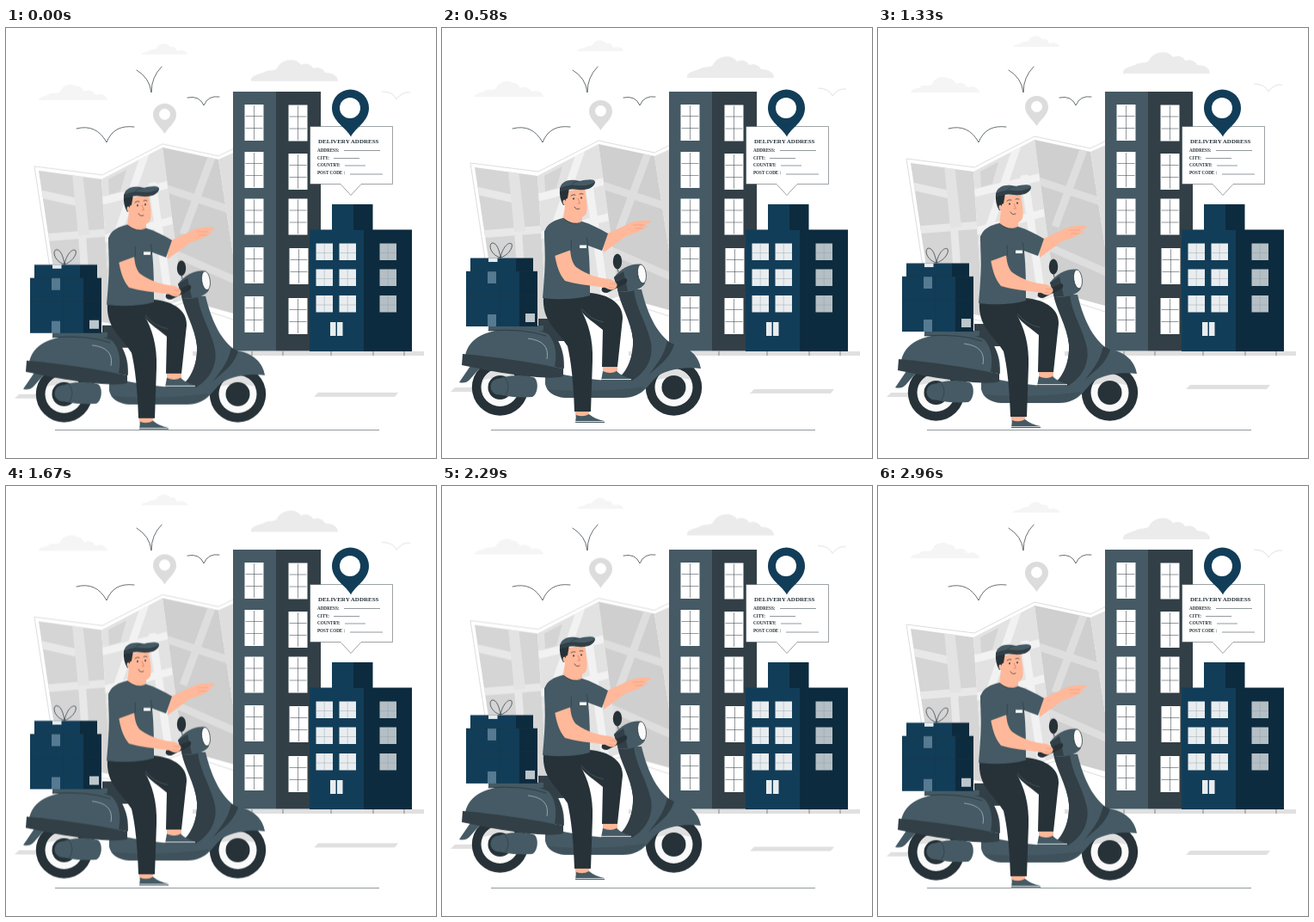
Write an HTML page that moves like this. It is 500x500 px and loops after 3 s.

```html
<!DOCTYPE html>
<html lang="en">
<head>
<meta charset="utf-8">
<title>Delivery address</title>
<style>
  html, body { margin: 0; width: 100%; height: 100%; overflow: hidden; background: #fff; }
  svg { display: block; width: 100vw; height: 100vh; }
  .drift { animation: bob 3s linear -.03s infinite; }
  .ride { animation: bob 1.5s linear -.02s infinite; }
  @keyframes bob { 50% { transform: translateY(-10px); } }

  .slate { fill: #455a64; }
  .deep { fill: #323f46; }
  .ink { fill: #263238; }
  .navy { fill: #123d58; }
  .night { fill: #0d2b3e; }
  .skin { fill: #ffb899; }
  .pale { fill: #e0e0e0; }
  .white { fill: #fff; }
  .line { fill: none; stroke: #263238; stroke-width: .7; stroke-linecap: round; stroke-linejoin: round; }
  .thin { fill: none; stroke: #263238; stroke-width: .5; }
  .road { fill: none; stroke-width: 9; }
  text { font-family: "Liberation Serif", "Times New Roman", serif; font-weight: bold; fill: #263238; }
</style>
</head>
<body>
<svg viewBox="0 0 500 500">
  <defs>
    <g id="tall">
      <rect class="white" width="22" height="42"/>
      <path class="thin" d="M11 1V41M1 13.500H21M1 27.500H21"/>
    </g>
    <g id="pane">
      <rect width="19.5" height="19.5"/>
      <path d="M9.7 0V19.5M0 11H19.5" fill="none" stroke="#8b9aa3" stroke-width=".4"/>
    </g>
    <g id="wheel">
      <circle class="ink" r="32.7"/>
      <circle r="22" fill="#fafafa"/>
      <path class="pale" d="M-20 -9A22 22 0 0 1 20 -9Q0 -14 -20 -9Z"/>
      <circle class="ink" r="14"/>
    </g>
    <clipPath id="p1"><path d="M38 166L111 176 122 344 63 333Z"/></clipPath>
    <clipPath id="p2"><path d="M111 176L182 139 206 316 122 344Z"/></clipPath>
    <clipPath id="p3"><path d="M182 139L247 153 275 335 206 316Z"/></clipPath>
  </defs>

  <!-- sky, map and road marking -->
  <g class="drift">
    <path fill="#f5f5f5" d="M38 84C38 79 47 80 50 77 54 74 59 78 63 74 66 66 77 64 82 68 86 67 89 71 91 74 97 71 102 74 104 78 111 76 117 79 118 84Z"/>
    <path fill="#f5f5f5" d="M157 31C158 27 164 29 167 26 171 24 174 26 176 22 181 17 188 18 191 22 196 21 198 24 199 27 206 25 211 28 211 31Z"/>
    <path fill="#ebebeb" d="M285 62C284 55 294 54 299 52 305 48 311 51 315 47 320 36 337 34 343 43 350 40 355 43 357 47 364 45 369 48 371 52 380 52 386 56 386 62Z"/>
    <path fill="none" stroke="#d4d4d4" stroke-width=".7" d="M437 74Q450 74 454 83Q460 74 470 75"/>

    <path d="M33 161L112 171 182 135 247 149 290 128 300 352 264 339 205 320 122 350 60 338Z" fill="#fff" stroke="#dcdcdc"/>
    <g clip-path="url(#p1)">
      <path fill="#d5d5d5" d="M30 150H130V350H30Z"/>
      <path class="road" stroke="#e8e8e8" d="M83 160L96 350M35 192L84 203M45 244L120 238"/>
      <path fill="#e3e3e3" d="M76 160L88 160 97 240 84 241Z"/>
    </g>
    <g clip-path="url(#p2)">
      <path fill="#e2e2e2" d="M100 130H210V350H100Z"/>
      <path class="road" stroke="#f2f2f2" d="M164 140L122 262M108 202L190 182M112 246L200 222M170 180L190 320"/>
      <path fill="#d4d4d4" d="M119 176L140 165 133 190 120 194Z"/>
    </g>
    <g clip-path="url(#p3)">
      <path fill="#cfcfcf" d="M180 130H280V340H180Z"/>
      <path class="road" stroke="#dedede" d="M184 186L262 212M240 148L206 240M195 262L272 296"/>
    </g>
    <path fill="#dedede" d="M247 153L292 133 295 345 275 335Z"/>

    <path fill="#dcdcdc" fill-rule="evenodd" d="M184.500 123C180 115 171 110 171 101A13.500 13 0 0 1 198 101C198 110 189 115 184.500 123ZM184.500 94A6.500 6.500 0 1 0 184.500 107A6.500 6.500 0 1 0 184.500 94Z"/>
    <path class="pale" d="M363 424H456L452 429H358Z"/>
  </g>

  <g class="line">
    <path d="M82 117Q105 111 117 133Q125 112 149 115"/>
    <path d="M152 49Q167 58 169 75Q169 57 181 45"/>
    <path d="M211 81Q225 78 230 90Q235 78 248 80"/>
  </g>
  <path class="thin" d="M57 467.500H434"/>

  <!-- buildings -->
  <path class="pale" d="M217 376H486V381H217Z"/>
  <path class="thin" d="M286 376V381M322 376V381M378 376V381M427 376V381M463 376V381"/>
  <path class="slate" d="M264 74H314V375.500H264Z"/>
  <path class="deep" d="M314 74H366V375.500H314Z"/>
  <use href="#tall" x="277.500" y="89"/><use href="#tall" x="328.500" y="89.500"/>
  <use href="#tall" x="277.500" y="144"/><use href="#tall" x="328.500" y="146"/>
  <use href="#tall" x="277.500" y="198.500"/><use href="#tall" x="328.500" y="198.500"/>
  <use href="#tall" x="277.500" y="255"/><use href="#tall" x="329.500" y="256"/>
  <use href="#tall" x="277.500" y="312"/><use href="#tall" x="328.500" y="314"/>

  <path class="navy" d="M353 234.500H416V376H353ZM379 205H404V235H379Z"/>
  <path class="night" d="M416 234.500H472V376H416ZM404 205H426.500V235H404Z"/>
  <g fill="#e9edef">
    <use href="#pane" x="360.500" y="250.500"/><use href="#pane" x="387.500" y="250.500"/>
    <use href="#pane" x="360.500" y="280.500"/><use href="#pane" x="387.500" y="280.500"/>
    <use href="#pane" x="360.500" y="311"/><use href="#pane" x="387.500" y="311"/>
    <path d="M377 342H383.500V358H377ZM385 342H391.500V358H385Z"/>
  </g>
  <g fill="#b4bfc5">
    <use href="#pane" x="434.500" y="250.500"/><use href="#pane" x="434.500" y="280.500"/><use href="#pane" x="434.500" y="311"/>
  </g>

  <!-- address card -->
  <path d="M353.500 114.500H449.500V181.500H413L401 194.500 389 181.500H353.500Z" fill="#fff" stroke="#263238" stroke-width=".45"/>
  <text x="363" y="134" font-size="7">DELIVERY ADDRESS</text>
  <g font-size="5.1">
    <text x="362" y="144.300">ADDRESS:</text>
    <text x="362" y="152.800">CITY:</text>
    <text x="362" y="161.200">COUNTRY:</text>
    <text x="362" y="169.800">POST CODE :</text>
  </g>
  <path class="thin" d="M393 142.500H435M381 151.500H411M394 160H418M400 170H438"/>
  <path class="navy" d="M401 126.500C396 116 379 109 379 93A21.500 21.500 0 0 1 422 93C422 109 406 116 401 126.500Z"/>
  <circle class="white" cx="400" cy="93" r="12"/>

  <g class="ride">
    <path class="pale" d="M15 426H85V431H10Z"/>

    <!-- scooter -->
    <path class="slate" d="M20 420L33 401H46L33 416Q28 422 20 420Z"/>
    <use href="#wheel" x="67.500" y="426"/>
    <use href="#wheel" x="269.500" y="426"/>
    <circle class="slate" cx="66" cy="425" r="9.500"/>
    <path class="slate" d="M66 416C78 411 100 411 108 415 113 421 111 434 105 437 92 438 76 437 66 434Z"/>
    <path class="thin" d="M73 414Q81 425 73 436"/>
    <path class="slate" d="M205 312L232 312C240 345 252 365 267 375 288 378 299 390 301 404 285 402 265 404 252 412 240 420 236 438 210 438L143 438C130 437 122 431 120 422L120 406C150 414 180 418 200 418 214 412 223 392 222 370 220 348 207 330 205 312Z"/>
    <path class="deep" d="M204 312C207 330 220 348 222 370 223 392 214 412 200 418L221 418C238 408 246 391 243 374 238 350 224 332 223 310Z"/>
    <path class="deep" d="M262 372L270 376C264 394 252 400 240 412 250 398 258 390 262 372Z"/>
    <path class="deep" d="M122 428Q180 433 236 425Q228 438 210 438H143Q128 437 122 428Z" opacity=".3"/>
    <path class="deep" d="M112 346H152L160 372H112Z"/>
    <path class="slate" d="M54 354H118V360H54Z"/>
    <path class="slate" d="M27 389C31 368 52 359 80 358 118 356 144 364 142 404Z"/>
    <path class="deep" d="M116 358C134 362 142 378 141 404L131 402C135 382 130 366 116 358Z"/>
    <path class="deep" d="M24 387C60 390 105 397 141 404L141 413C125 418 75 411 23 400Z"/>
    <path class="line" d="M54 360Q95 357 121 366"/>
    <path d="M100 369Q126 372 122 393" fill="none" stroke="#b8c4ca" stroke-width=".7"/>

    <path class="line" d="M204 284Q203 292 210 299" stroke-width="1.500"/>
    <ellipse class="ink" cx="204" cy="279.500" rx="5.200" ry="9"/>
    <path class="slate" d="M200 298C208 287 222 281 232 283L236 305C231 313 214 317 205 314Z"/>
    <path class="deep" d="M200 298L211 291 216 314 205 314Z"/>
    <ellipse cx="232.500" cy="294" rx="4.800" ry="11" transform="rotate(-8 232 294)" fill="#fafafa" stroke="#263238" stroke-width=".7"/>
    <path class="ink" d="M186 310L213 299Q217 300 214 305L192 316Q184 316 186 310Z"/>

    <!-- parcels -->
    <path class="navy" d="M28 291H90V355H28ZM33 275.500H86V291H33Z"/>
    <path class="night" d="M90 291H111V355H90ZM86 275.500H106V291H86Z"/>
    <path fill="#557a91" d="M53 291H63V305H53ZM53 341H63V355H53Z"/>
    <path fill="#e6ecef" d="M54 275.500H64.500V280H54Z"/>
    <path fill="#bcc6cb" d="M97 340H108V350H97Z"/>
    <path class="thin" d="M28 291H111M67 291V355M28 318H111M90 291V355" opacity=".7"/>
    <path class="line" d="M68 275C58 273 53 261 58 258 64 257 67 268 68 275C70 264 77 256 81 259 83 264 76 273 68 275"/>

    <!-- rider -->
    <path class="skin" d="M187 400H204V409H187ZM155 452H171V460H155Z"/>
    <path class="slate" d="M187 407Q196 411 203 407Q209 413 220 416V418H185Z"/>
    <path class="slate" d="M156 458Q164 461 171 457Q178 463 189 465V467H155Z"/>
    <path d="M185 416.500H220M155 465.500H189" stroke="#d5dbde" stroke-width="1.200"/>
    <path class="ink" d="M135 320L172 316C196 318 211 330 210 346L204 402H186L187 359C178 351 168 346 161 336Z"/>
    <path class="ink" d="M118 320L160 319 161 335C170 350 176 370 175 395L173 454H154C153 420 150 395 146 378 134 358 116 350 118 320Z"/>
    <path d="M162 334Q172 347 188 350" fill="none" stroke="#55656d" stroke-width=".6"/>

    <path class="skin" d="M186 250L212 238C220 233 230 231 242 232 244 234 239 236 235 237 242 238 239 240 234 241 229 246 221 247 214 250L188 269Z"/>
    <path d="M222 237L235 237M224 241L234 241" stroke="#e58d70" stroke-width=".5"/>
    <path class="skin" d="M143 215H163V232Q155 239 141 230Z"/>
    <path class="slate" d="M119 246C121 235 132 231 141 229 149 235 157 237 163 233 173 236 183 241 193 247L186 267 170 261C172 280 172 300 172 319 155 324 135 324 117 322 119 300 121 275 119 246Z"/>
    <path class="thin" d="M150 254Q151 261 150 267M170 261L168 251M141 229Q151 239 163 233"/>
    <path class="white" d="M160 260.500H168V264H160Z"/>

    <path class="skin" d="M131 271L149 266C150 276 152 282 156 286 170 296 184 299 195 300 202 302 205 306 203 309 200 314 195 313 190 310 172 307 155 306 143 302 136 294 133 283 131 271Z"/>
    <path d="M195 305L203 306M194 309L201 311" stroke="#e58d70" stroke-width=".5"/>
    <path class="slate" d="M119 244C127 237 143 246 150 266L131 273 120 275Z"/>

    <path class="skin" d="M143 198L166 194C167 205 170 214 168 223 165 231 152 231 147 225L143 213Z"/>
    <path class="ink" d="M137 195L148 194 146 206 144 207 144 214 141 214Q136 206 137 195Z"/>
    <path class="skin" d="M143 208C140 206 139 213 144 215L147 213Z"/>
    <circle class="ink" cx="153" cy="206.500" r="1"/>
    <circle class="ink" cx="162" cy="205.500" r="1"/>
    <path class="line" d="M150 203Q152 201 155 202M160 201Q162 200 164 201M154 216Q156 220 160 218"/>
    <path d="M158 206L160.500 212H157.500" fill="none" stroke="#d97a5e" stroke-width=".7"/>
    <path class="slate" d="M137 198C136 187 147 182 160 186 168 184 178 183 178 187 177 193 169 196 160 196 151 194 143 196 137 198Z"/>
    <path class="deep" d="M137 198L137 194Q148 189 159 191Q171 192 178 187C177 194 168 197 159 196Q148 194 137 198Z"/>
    <path class="thin" d="M160 186Q152 187 149 192"/>
  </g>
</svg>
</body>
</html>
```
